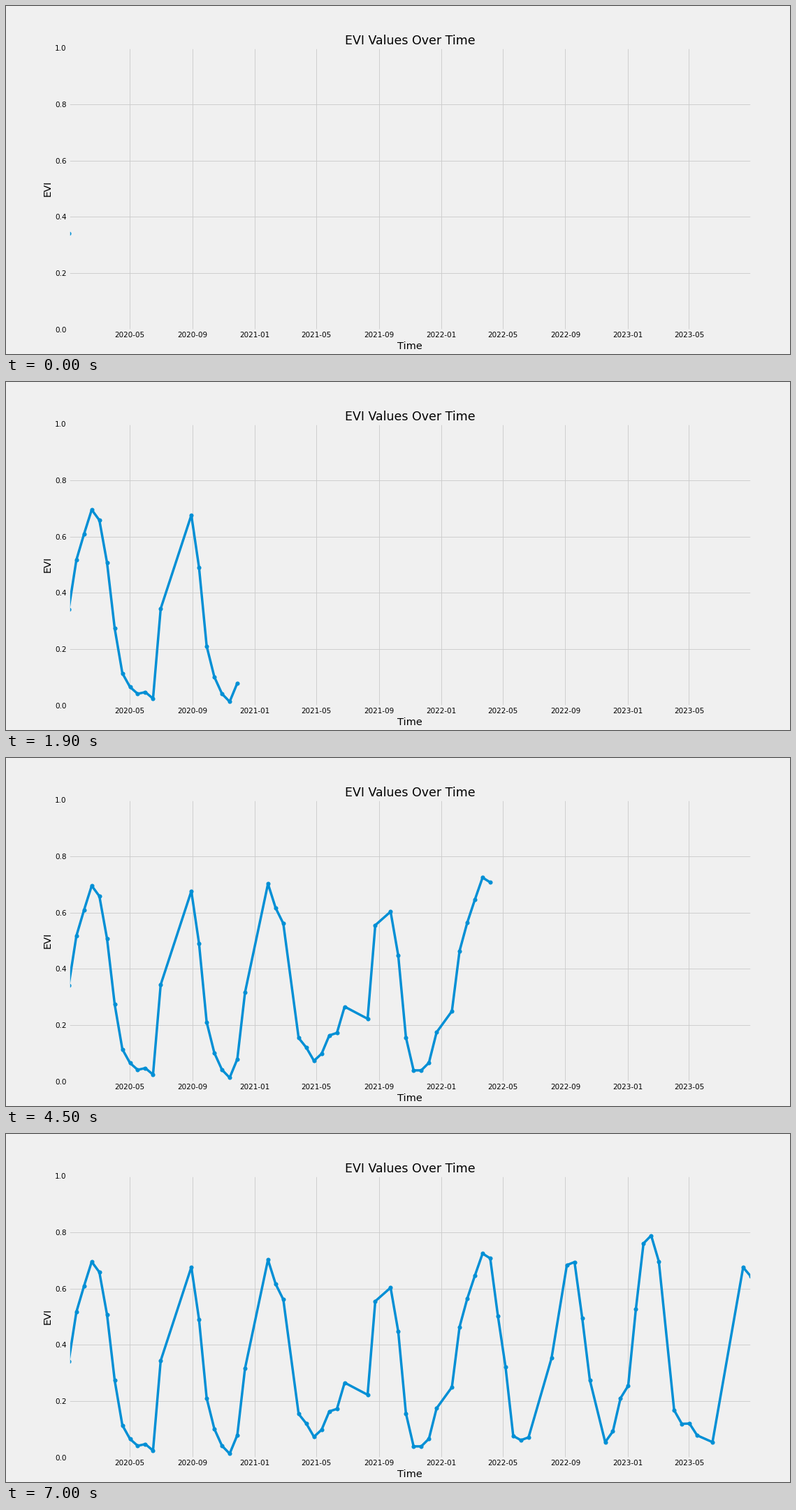
A matplotlib script for the animation above (7100 ms loop, 1122 by 499 pixels).

```python
import matplotlib.dates as mdates
import matplotlib.pyplot as plt
import numpy as np
from matplotlib.animation import FuncAnimation

BG = "#f0f0f0"
DPI = 187 / 3

plt.rcParams.update({
    "font.family": "DejaVu Sans",
    "font.size": 14,
    "figure.facecolor": BG,
    "figure.subplot.left": 0.08,
    "figure.subplot.right": 0.95,
    "figure.subplot.bottom": 0.07,
    "figure.subplot.top": 0.88,
    "axes.facecolor": BG,
    "axes.edgecolor": BG,
    "axes.linewidth": 3,
    "axes.axisbelow": True,
    "axes.grid": True,
    "axes.labelsize": "large",
    "axes.titlesize": "x-large",
    "grid.color": "#cbcbcb",
    "grid.linewidth": 1,
    "xtick.major.size": 0,
    "ytick.major.size": 0,
    "xtick.labelsize": 12,
    "ytick.labelsize": 12,
    "lines.solid_capstyle": "butt",
})

# One composite every 15 days; cloudy ones are missing.
SLOTS = 90
MISSING = [13, 14, 15, 24, 25, 29, 37, 38, 41, 49,
           61, 62, 64, 69, 78, 83, 85, 86, 87]
EVI = np.array([
    0.342, 0.517, 0.609, 0.695, 0.658, 0.507, 0.274, 0.115, 0.066, 0.042,
    0.048, 0.025, 0.344, 0.676, 0.491, 0.211, 0.102, 0.042, 0.014, 0.080,
    0.316, 0.702, 0.616, 0.561, 0.155, 0.121, 0.074, 0.099, 0.164, 0.173,
    0.266, 0.223, 0.555, 0.603, 0.447, 0.157, 0.040, 0.040, 0.067, 0.175,
    0.250, 0.464, 0.564, 0.646, 0.724, 0.707, 0.503, 0.321, 0.077, 0.062,
    0.072, 0.353, 0.683, 0.694, 0.496, 0.275, 0.055, 0.093, 0.211, 0.255,
    0.526, 0.760, 0.788, 0.696, 0.168, 0.120, 0.121, 0.079, 0.055, 0.675,
    0.643,
])
start = mdates.date2num(np.datetime64("2020-01-03"))
days = start + 15 * np.delete(np.arange(SLOTS), MISSING)

fig, ax = plt.subplots(figsize=(18, 8.00535), dpi=DPI)
ax.set(xlim=(days[0], days[-1]), ylim=(0, 1),
       xlabel="Time", ylabel="EVI", title="EVI Values Over Time")
ax.xaxis.set_major_locator(mdates.MonthLocator(bymonth=(1, 5, 9)))
ax.xaxis.set_major_formatter(mdates.DateFormatter("%Y-%m"))

line, = ax.plot([], [], "o-", color="#008fd5", lw=4, ms=6)


def update(i):
    line.set_data(days[:i + 1], EVI[:i + 1])
    return line,


anim = FuncAnimation(fig, update, frames=len(EVI), interval=100,
                     repeat=True, repeat_delay=0)
plt.show()
```
